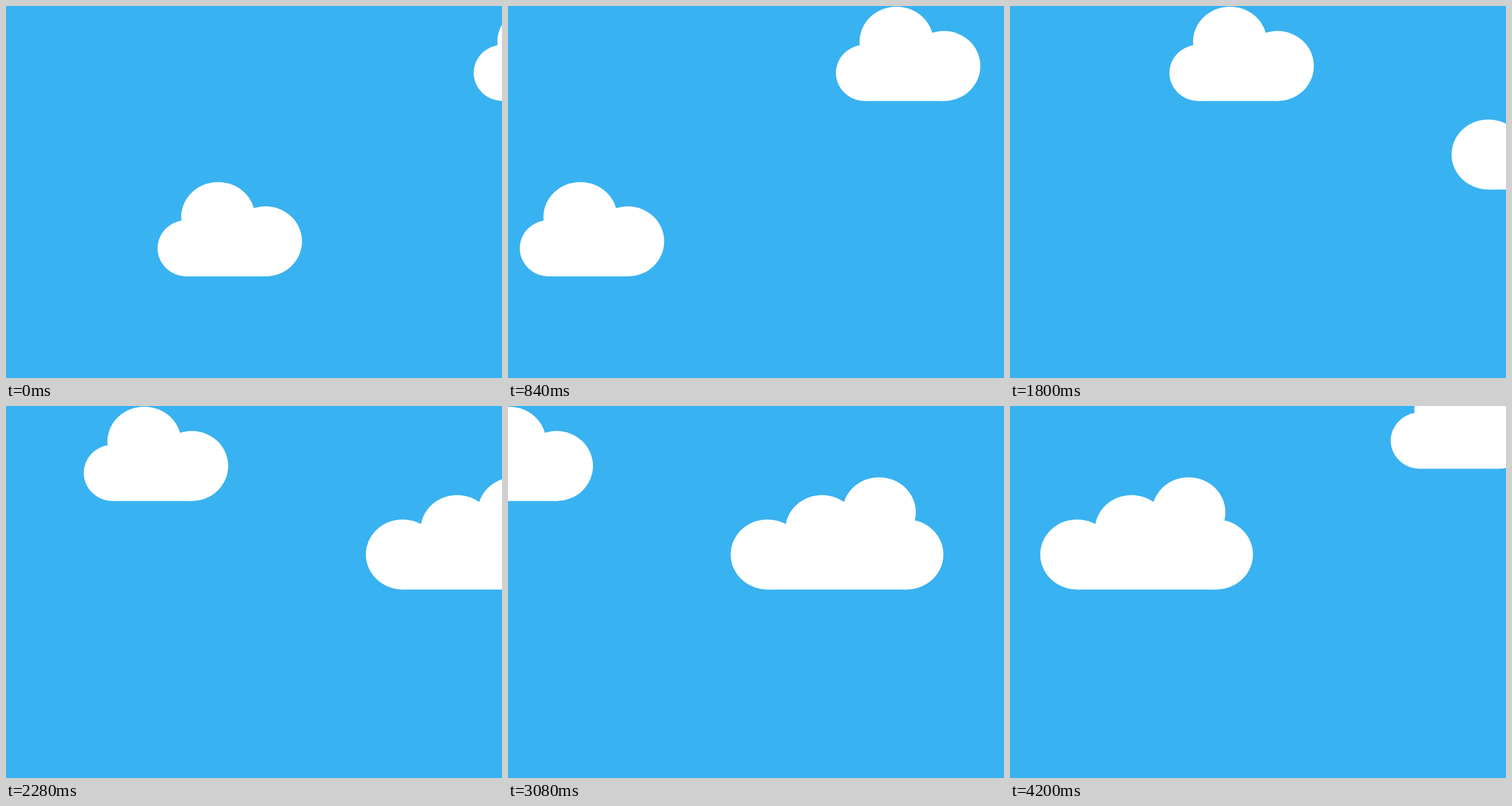
An HTML page for the animation above (4.24 s loop, 864 by 648 pixels).

```html
<!DOCTYPE html>
<html lang="en">
<head>
<meta charset="utf-8">
<title>Drifting clouds</title>
<style>
  html, body { margin: 0; width: 100%; height: 100%; overflow: hidden; background: #39b2f1; }
  svg { display: block; width: 100%; height: 100%; }
</style>
</head>
<body>
<svg viewBox="0 0 864 648">
  <defs>
    <!-- Each cloud starts at x = 0 and rests on y = 0 -->
    <g id="small">
      <ellipse cx="51" cy="-49" rx="51" ry="49"/>
      <ellipse cx="105.5" cy="-103.3" rx="64.3" ry="61"/>
      <ellipse cx="188.3" cy="-61" rx="63.3" ry="61"/>
      <rect x="51" y="-92" width="137.3" height="92"/>
    </g>
    <g id="large">
      <ellipse cx="64" cy="-61" rx="64" ry="61"/>
      <ellipse cx="159" cy="-103.5" rx="64" ry="61"/>
      <ellipse cx="258.5" cy="-134.5" rx="64" ry="61"/>
      <ellipse cx="306.5" cy="-61" rx="64" ry="61"/>
      <rect x="64" y="-100" width="242.5" height="100"/>
    </g>
  </defs>
  <rect width="864" height="648" fill="#39b2f1"/>
  <g id="sky" fill="#fff">
    <use href="#small" x="264" y="471"/>
    <use href="#small" x="814.7" y="165.5"/>
    <use href="#large" x="1306.2" y="319.7"/>
    <use href="#small" x="1916.7" y="109.3"/>
  </g>
</svg>
<script>
  const LOOP = 4240, STEP = 40;
  const sky = document.getElementById("sky");

  // [time in ms, distance drifted to the left]
  const drift = [
    [0, 0], [560, 165.5], [840, 243.5], [1320, 394.7], [2280, 679.3],
    [3080, 918.3], [3640, 1088.3], [4200, 1253.5]
  ];

  function distanceAt(time) {
    const next = Math.max(1, drift.findIndex(([t]) => t >= time));
    const [t0, d0] = drift[next - 1], [t1, d1] = drift[next];
    return d0 + (d1 - d0) * (time - t0) / (t1 - t0);
  }

  function draw(now) {
    const time = Math.floor((now % LOOP) / STEP) * STEP;
    sky.setAttribute("transform", `translate(${-distanceAt(time)} 0)`);
  }

  const start = performance.now();
  function tick() {
    draw(performance.now() - start);
    requestAnimationFrame(tick);
  }
  tick();
</script>
</body>
</html>
```
